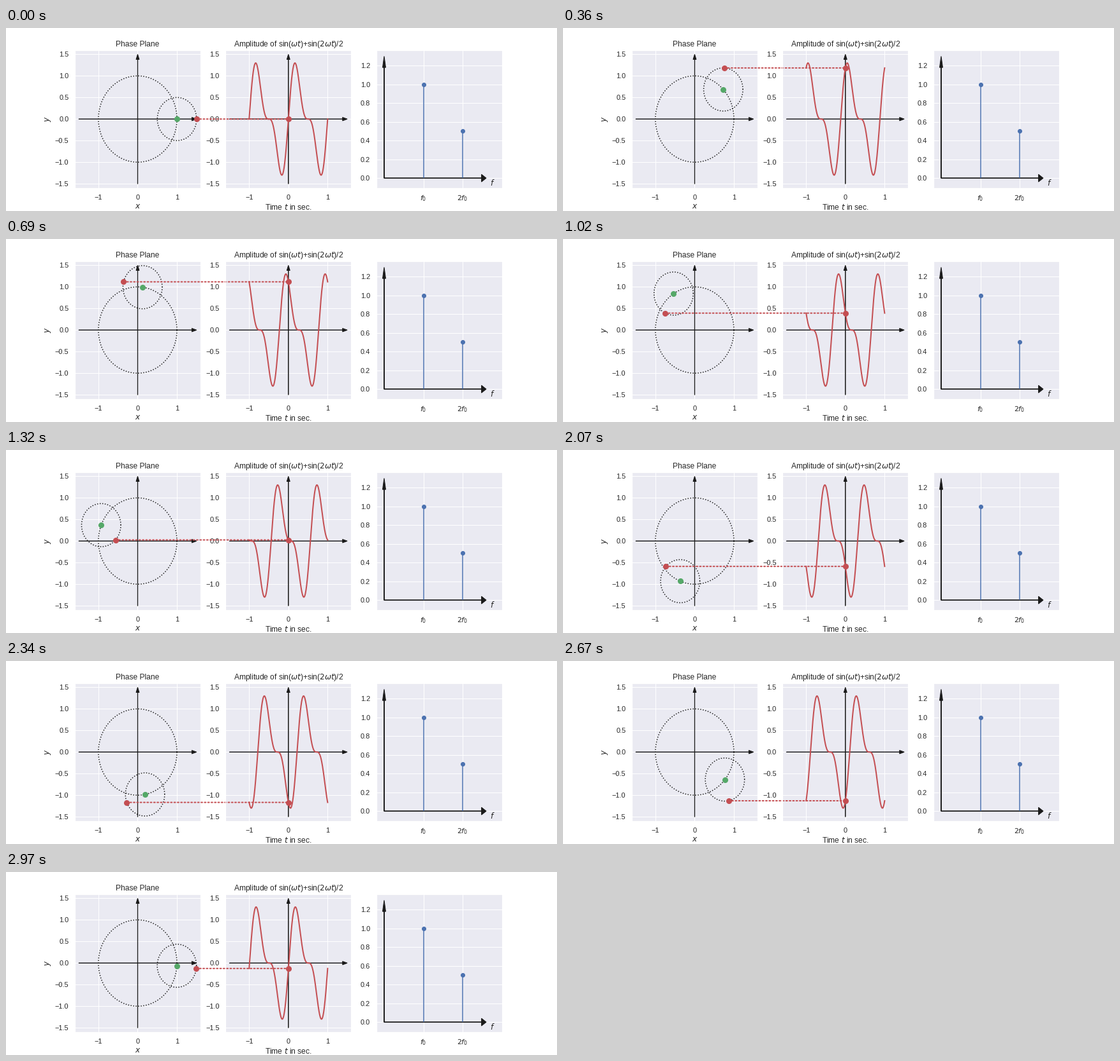
Write a matplotlib script that moves like this. It is 864 px wide and 288 px high and loops after 3000 ms.

```python
import numpy as np
import matplotlib.pyplot as plt
from matplotlib.animation import FuncAnimation
from matplotlib.patches import ConnectionPatch

FRAMES = 100
INTERVAL = 30
BLACK, RED, GREEN, BLUE = "#1a1a1a", "#c44e52", "#55a868", "#4c72b0"
TEXT = "0.15"

plt.rcParams.update({
    "font.family": "Liberation Sans",
    "mathtext.fontset": "dejavusans",
    "font.size": 12,
    "axes.titlesize": 12,
    "axes.labelsize": 12,
    "xtick.labelsize": 11,
    "ytick.labelsize": 11,
    "text.color": TEXT,
    "axes.labelcolor": TEXT,
    "xtick.color": TEXT,
    "ytick.color": TEXT,
    "axes.facecolor": "#eaeaf2",
    "axes.edgecolor": "white",
    "axes.linewidth": 1.25,
    "axes.axisbelow": True,
    "axes.grid": True,
    "grid.color": "white",
    "grid.linewidth": 1,
    "xtick.bottom": False,
    "ytick.left": False,
    "xtick.major.size": 6,
    "ytick.major.size": 6,
    "xtick.major.pad": 3.5,
    "ytick.major.pad": 3.5,
})


def axis_arrow(ax, x, y, dx, dy):
    ax.arrow(x, y, dx, dy, width=0.005, head_width=0.08, head_length=0.12,
             length_includes_head=True, fc=BLACK, ec=BLACK, lw=1)


def dot(ax, color):
    return ax.plot([], [], "o", color=color, ms=8)[0]


def wave(t):
    return np.sin(2 * np.pi * t) + np.sin(4 * np.pi * t) / 2


fig, (phase, amp, spec) = plt.subplots(1, 3, figsize=(12, 4), dpi=72)
fig.subplots_adjust(left=0.125, right=0.9, bottom=0.125, top=0.88, wspace=0.2)

for ax in (phase, amp):
    ax.set(xlim=(-1.6, 1.6), ylim=(-1.6, 1.6),
           xticks=[-1, 0, 1], yticks=np.arange(-1.5, 1.6, 0.5))
    axis_arrow(ax, -1.5, 0, 3, 0)
    axis_arrow(ax, 0, -1.5, 0, 3)

phase.set(title="Phase Plane", xlabel="$x$", ylabel="$y$")
amp.set(title=r"Amplitude of sin($\omega t$)+sin($2\omega t$)/2",
        xlabel="Time $t$ in sec.")

# Spectrum panel
axis_arrow(spec, 0, 0, 2.6, 0)
axis_arrow(spec, 0, 0, 0, 1.3)
spec.vlines([1, 2], 0, [1, 0.5], color=BLUE, lw=1.5)
spec.plot([1, 2], [1, 0.5], "o", color=BLUE, ms=6)
spec.text(2.7, -0.08, "$f$")
spec.set(xlim=(-0.2, 3), ylim=(-0.107, 1.367), yticks=np.arange(0, 1.3, 0.2))
spec.set_xticks([1, 2], ["$f_0$", "$2f_0$"])

# Moving parts
angle = np.linspace(0, 2 * np.pi, 201)
ring = np.cos(angle), np.sin(angle)
phase.plot(*ring, ":", color=BLACK, lw=1.5)
small, = phase.plot([], [], ":", color=BLACK, lw=1.5)
hub, tip = dot(phase, GREEN), dot(phase, RED)

time = np.linspace(-1, 1, 401)
curve, = amp.plot([], [], color=RED, lw=2)
now = dot(amp, RED)
link = ConnectionPatch((0, 0), (0, 0), "data", "data", axesA=phase, axesB=amp,
                       color=RED, lw=2, ls=":")
amp.add_artist(link)


def update(i):
    tau = i / FRAMES
    a = 2 * np.pi * tau
    cx, cy = np.cos(a), np.sin(a)
    x, y = cx + np.cos(2 * a) / 2, cy + np.sin(2 * a) / 2
    small.set_data(cx + ring[0] / 2, cy + ring[1] / 2)
    hub.set_data([cx], [cy])
    tip.set_data([x], [y])
    curve.set_data(time, wave(time + tau))
    now.set_data([0], [y])
    link.xy1, link.xy2 = (x, y), (0, y)
    return small, hub, tip, curve, now, link


anim = FuncAnimation(fig, update, frames=FRAMES, interval=INTERVAL,
                     repeat=True, repeat_delay=0, blit=False)
plt.show()
```
